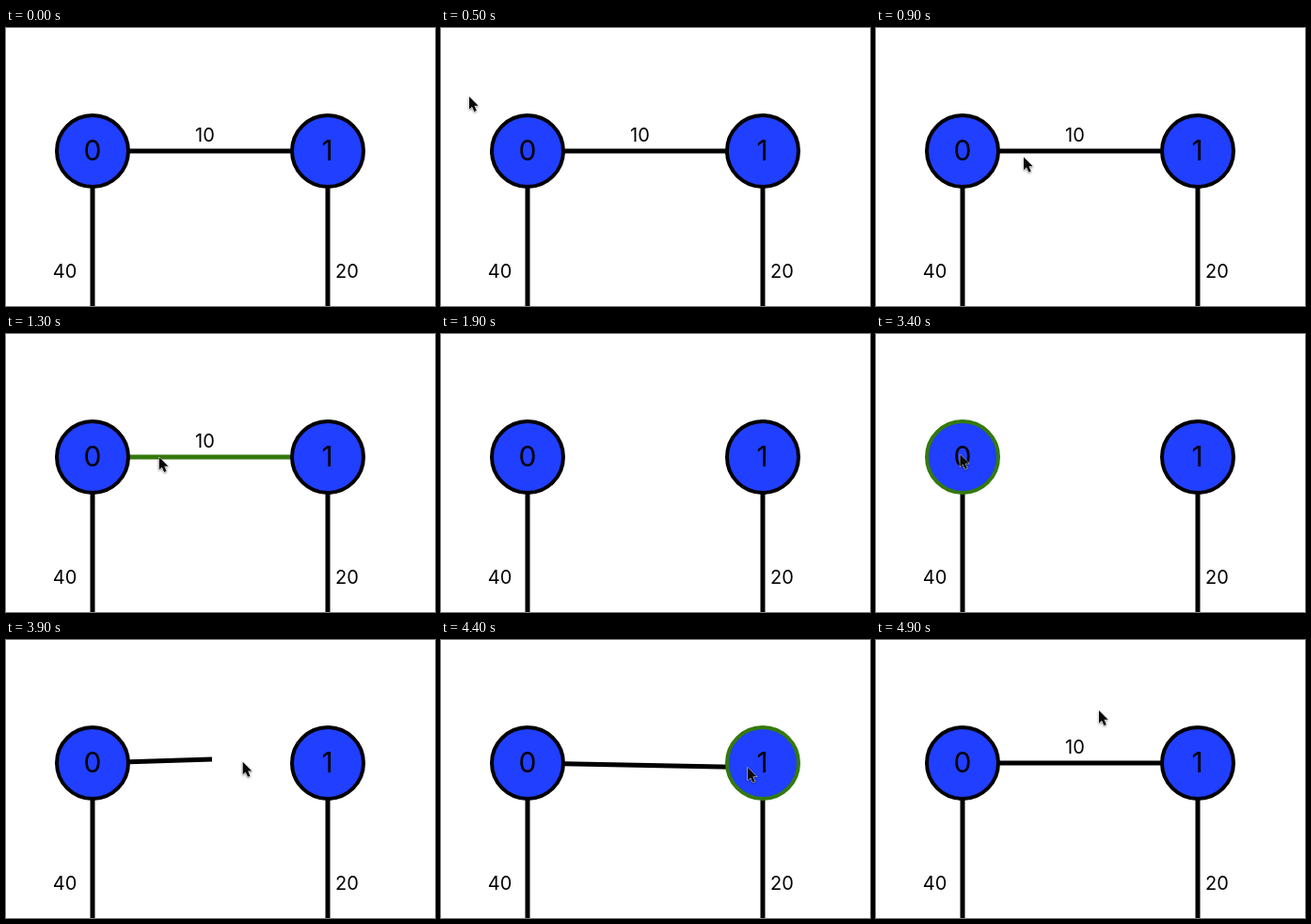
These frames come from a looping animation (456 px wide and 296 px high, 5 s). An HTML page:

```html
<!DOCTYPE html>
<html lang="en">
<head>
<meta charset="utf-8">
<title>Graph editor</title>
<style>
  html, body { margin: 0; width: 100%; height: 100%; overflow: hidden; background: #fff; }
  svg { display: block; width: 456px; height: 296px; }
  text { font-family: Inter, Roboto, sans-serif; font-size: 20px; text-anchor: middle; }
  line { stroke: #000; stroke-width: 5; }
  circle { fill: #203fff; stroke: #000; stroke-width: 4; }
  .node text { font-size: 30px; }
  .hot { stroke: #34790b; }
  #cursor { filter: drop-shadow(.5px 1.5px 1.2px rgba(0, 0, 0, .45)); }
</style>
</head>
<body>
<svg viewBox="0 0 456 296">
  <line x1="92" y1="131" x2="92" y2="300"/>
  <line x1="342" y1="131" x2="342" y2="300"/>
  <line id="edge" x1="92" y1="131"/>
  <text id="weight" x="211.5" y="121">10</text>
  <text x="62.5" y="266">40</text>
  <text x="362.5" y="266">20</text>
  <g class="node"><circle cx="92" cy="131" r="38"/><text x="92" y="141">0</text></g>
  <g class="node"><circle cx="342" cy="131" r="38"/><text x="341.5" y="141">1</text></g>
  <path id="cursor" d="M0 0V13.6L3 10.8L5.4 16L7.8 15L5.5 9.8H9.7Z"
    fill="#0a0a0a" stroke="#fff" stroke-width="1" paint-order="stroke"/>
</svg>
<script>
const LOOP = 5000, STEP = 100;
const REMOVED = 1700, DRAG = 3600, LINKED = 4600;
const NODES = [{ x: 92, y: 131 }, { x: 342, y: 131 }];

// Pointer stops; it slows down towards each one.
const visits = [
  { until: 1900, stops: [
    { t: 500, x: 30, y: 73 }, { t: 900, x: 157, y: 137.5 },
    { t: 1100, x: 162, y: 137 }, { t: 1500, x: 163, y: 129 }] },
  { until: 5000, stops: [
    { t: 3000, x: 25, y: 81 }, { t: 3500, x: 92, y: 130 }, { t: 3800, x: 219, y: 127 },
    { t: 4400, x: 326, y: 135.7 }, { t: 4700, x: 326, y: 135.7 }, { t: 4900, x: 237, y: 75 }] }
];

const $ = id => document.getElementById(id);
const edge = $('edge'), weight = $('weight'), cursor = $('cursor');
const circles = [...document.querySelectorAll('circle')];
const show = (el, on) => { el.style.display = on ? '' : 'none'; };
const easeOut = u => 1 - (1 - u) ** 2;

function pointerAt(t) {
  const visit = visits.find(v => t >= v.stops[0].t && t < v.until);
  if (!visit) return null;
  const next = visit.stops.findIndex(s => s.t > t);
  if (next < 0) return visit.stops.at(-1);
  const a = visit.stops[next - 1], b = visit.stops[next];
  const k = easeOut((t - a.t) / (b.t - a.t));
  return { x: a.x + (b.x - a.x) * k, y: a.y + (b.y - a.y) * k };
}

function draw(t) {
  const p = pointerAt(t);
  const linked = t < REMOVED || t >= LINKED;
  const dragging = t >= DRAG && t < LINKED;

  show(cursor, p);
  if (p) cursor.setAttribute('transform', `translate(${p.x} ${p.y})`);

  // The loose end trails the pointer by one step.
  const end = dragging ? pointerAt(t - STEP) : NODES[1];
  edge.setAttribute('x2', end.x);
  edge.setAttribute('y2', end.y);
  show(edge, linked || dragging);
  show(weight, linked);

  const over = NODES.map(n => !!p && Math.hypot(p.x - n.x, p.y - n.y) < 40);
  circles.forEach((c, i) => c.classList.toggle('hot', over[i]));
  const onEdge = !!p && linked && !over.includes(true) && Math.abs(p.y - 131) < 3;
  edge.classList.toggle('hot', onEdge);
}

const start = performance.now();
function tick(now) {
  const t = Math.max(0, now - start) % LOOP;
  draw(Math.floor(t / STEP) * STEP);
  requestAnimationFrame(tick);
}
draw(0);
requestAnimationFrame(tick);
</script>
</body>
</html>
```
